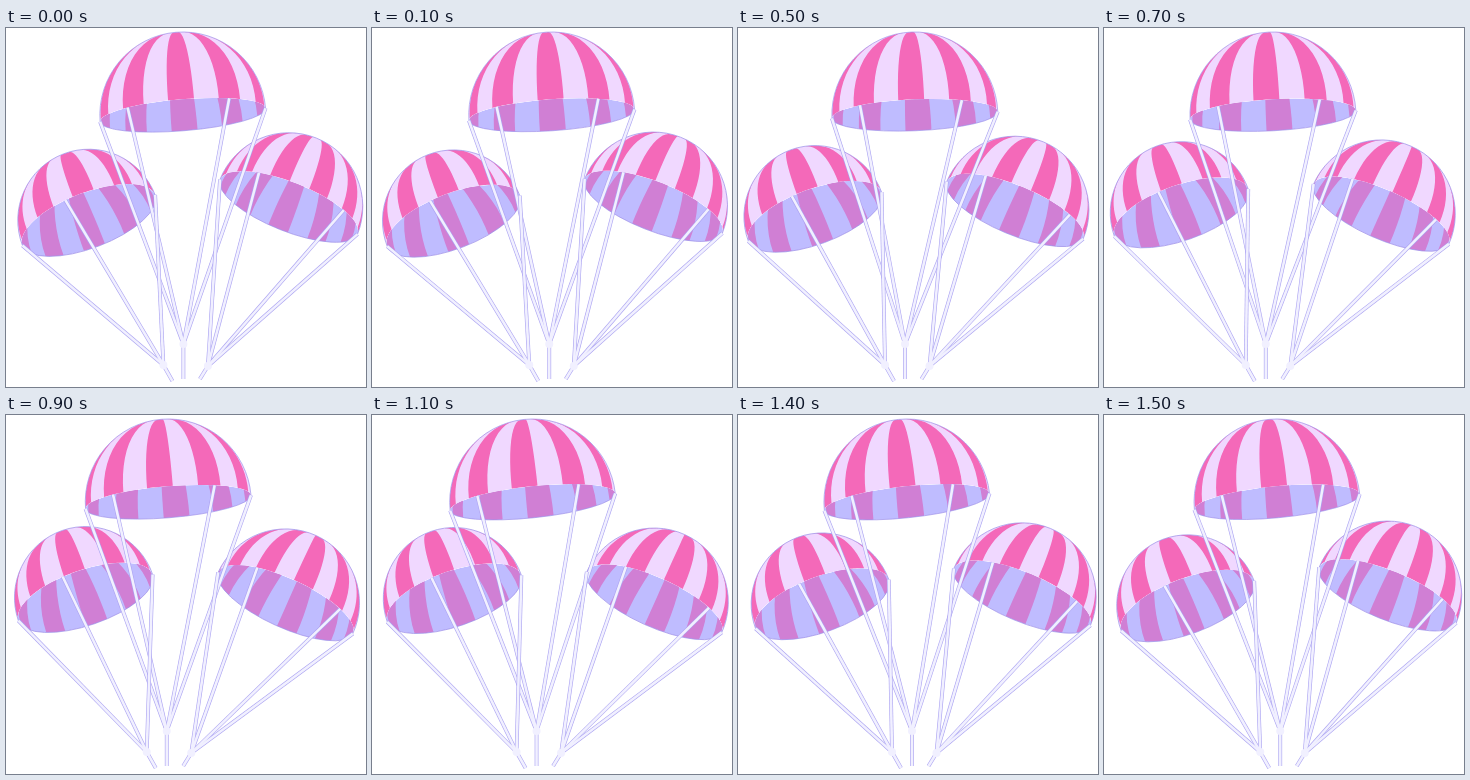
An HTML page with a canvas for the animation above (1600 ms loop, 360 px wide and 359 px high).

```html
<!DOCTYPE html>
<html lang="en">
<head>
<meta charset="utf-8">
<title>Parachutes</title>
<style>
  html, body { margin: 0; width: 100%; height: 100%; overflow: hidden; background: #fff; }
  canvas { display: block; width: 360px; height: 359px; }
</style>
</head>
<body>
<canvas id="stage" width="360" height="359"></canvas>
<script>
const ctx = document.getElementById('stage').getContext('2d');
const LOOP = 1600, STEP = 100, RAD = Math.PI / 180;
const PINK = '#f469b9', LIGHT = '#f0d8ff', SHADE_PINK = '#d07fd4', SHADE = '#bfbcff';
const EDGE = '#aaa2f2', CORD = '#f1f0ff';

const wave = (t, peak) => Math.cos((t - peak) / LOOP * 2 * Math.PI);
const lift = t => (1 + wave(t, 940)) / 2;
const drift = t => 3.7 * wave(t, 1370) - 2.5;

// Each canopy is a striped hemisphere seen from below.
// open: rim height / width, phase: longitude of a pink stripe, cords: rim longitudes (degrees).
const chutes = [
  {
    radius: 83, open: .19, pairs: 10, phase: 0, cords: [-90, -41, 35, 90],
    x: t => 171 + 10.5 * wave(t, 250), y: () => 87,
    tilt: t => -4.3 + 2 * wave(t, 450), spin: -5,
    knot: [169, 316], tail: [0, 35]
  },
  {
    radius: 71, open: .39, pairs: 10, phase: 4, cords: [-90, -12, 90],
    x: t => 83 + drift(t), y: t => 193 - 10.5 * lift(t),
    tilt: t => -21 + 2 * lift(t), spin: -6,
    knot: [149, 337], tail: [9, 16]
  },
  {
    radius: 74, open: .33, pairs: 11, phase: -14, cords: [90, 45, -33, -90],
    x: t => 283 + drift(t), y: t => 178 + 10 * lift(t),
    tilt: t => 21.5 + 3 * lift(t), spin: -12,
    knot: [193.5, 338], tail: [-8, 13]
  }
];

// Hemisphere point at longitude lon and latitude lat, in canopy coordinates.
function project({ radius, open }, lon, lat) {
  const ring = Math.cos(lat);
  const up = ring * Math.cos(lon) * open + Math.sin(lat) * Math.sqrt(1 - open * open);
  return [radius * ring * Math.sin(lon), -radius * up];
}

// Latitude where the outside surface turns out of sight.
const horizon = ({ open }, lon) =>
  Math.max(0, Math.atan(Math.cos(lon) * Math.sqrt(1 - open * open) / open));

function addStripe(ch, from, to, top) {
  const N = 12;
  const points = [];
  for (let i = 0; i <= N; i++) points.push(project(ch, from, top(from) * i / N));
  for (let i = 1; i < N; i++) {
    const lon = from + (to - from) * i / N;
    points.push(project(ch, lon, top(lon)));
  }
  for (let i = N; i >= 0; i--) points.push(project(ch, to, top(to) * i / N));
  for (let i = N - 1; i > 0; i--) points.push(project(ch, from + (to - from) * i / N, 0));
  points.forEach((p, i) => i ? ctx.lineTo(...p) : ctx.moveTo(...p));
  ctx.closePath();
}

function fillStriped(ch, shape, base, color, turn, top) {
  ctx.save();
  ctx.clip(shape);
  ctx.fillStyle = base;
  ctx.fill(shape);
  ctx.fillStyle = color;
  for (let k = 0; k < ch.pairs; k++) {
    const mid = turn + k * 2 * Math.PI / ch.pairs;
    const half = Math.PI / 2 / ch.pairs;
    ctx.beginPath();
    addStripe(ch, mid - half, mid + half, top);
    ctx.fill();
  }
  ctx.restore();
}

function drawCanopy(ch, t) {
  const r = ch.radius, h = r * ch.open;
  const turn = (ch.phase + ch.spin * lift(t)) * RAD;
  const rim = new Path2D();
  rim.ellipse(0, 0, r, h, 0, 0, 2 * Math.PI);
  const dome = new Path2D();
  dome.arc(0, 0, r, Math.PI, 0);
  dome.ellipse(0, 0, r, h, 0, 0, Math.PI, true);
  const outline = new Path2D();
  outline.arc(0, 0, r, Math.PI, 0);
  outline.ellipse(0, 0, r, h, 0, 0, Math.PI);

  ctx.save();
  ctx.translate(ch.x(t), ch.y(t));
  ctx.rotate(ch.tilt(t) * RAD);
  fillStriped(ch, rim, SHADE, SHADE_PINK, turn, () => Math.PI / 2);
  fillStriped(ch, dome, LIGHT, PINK, turn, lon => horizon(ch, lon));
  ctx.strokeStyle = '#a093ea';
  ctx.lineWidth = .7;
  ctx.stroke(outline);
  ctx.restore();
}

function line(a, b, width, color) {
  ctx.strokeStyle = color;
  ctx.lineWidth = width;
  ctx.beginPath();
  ctx.moveTo(...a);
  ctx.lineTo(...b);
  ctx.stroke();
}

function drawCords(ch, t) {
  const tilt = ch.tilt(t) * RAD, cos = Math.cos(tilt), sin = Math.sin(tilt);
  const knot = [ch.knot[0] + 8.5 * wave(t, 40), ch.knot[1]];
  const tail = [knot[0] + ch.tail[0], knot[1] + ch.tail[1]];
  const ends = ch.cords.map(lon => {
    const [x, y] = project(ch, lon * RAD, 0);
    return [ch.x(t) + x * cos - y * sin, ch.y(t) + x * sin + y * cos];
  });
  for (const [width, color] of [[3.8, EDGE], [2.6, CORD]]) {
    [...ends, tail].forEach(end => line(end, knot, width, color));
  }
  ctx.fillStyle = CORD;
  ctx.beginPath();
  ctx.arc(...knot, 4, 0, 2 * Math.PI);
  ctx.fill();
}

function draw() {
  const t = Math.floor(performance.now() % LOOP / STEP) * STEP;
  ctx.fillStyle = '#fff';
  ctx.fillRect(0, 0, 360, 359);
  chutes.forEach(ch => drawCanopy(ch, t));
  chutes.forEach(ch => drawCords(ch, t));
  requestAnimationFrame(draw);
}
draw();
</script>
</body>
</html>
```
